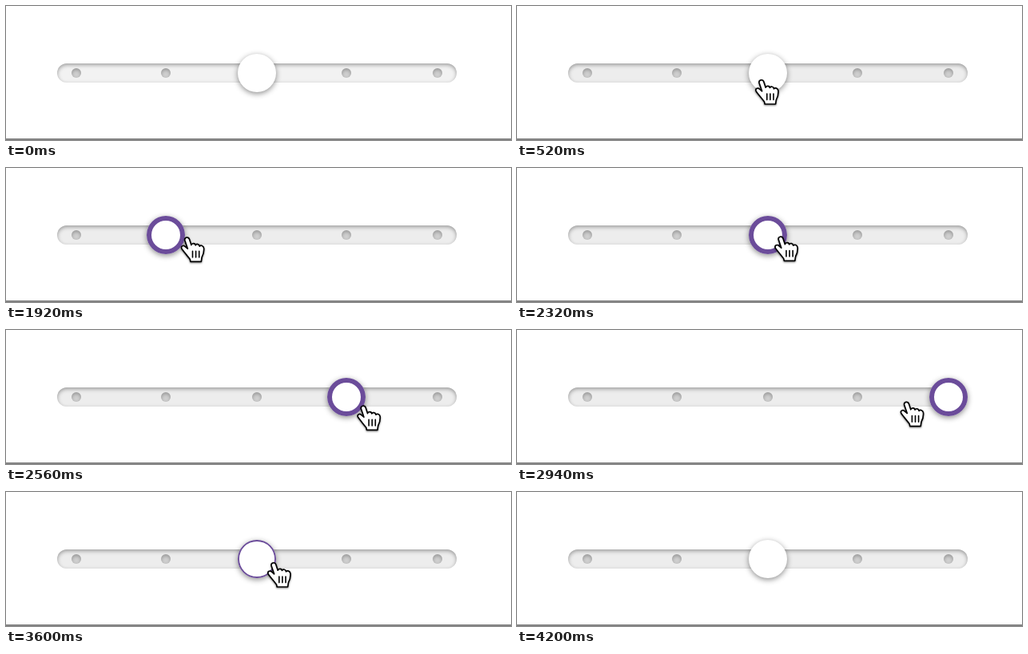
Write an HTML page that moves like this. It is 632 by 168 pixels and loops after 4.58 s.

```html
<!DOCTYPE html>
<html lang="en">
<head>
<meta charset="utf-8">
<title>Snapping slider</title>
<style>
  html, body { margin: 0; width: 100%; height: 100%; overflow: hidden; background: #fff; }
  #stage { position: relative; width: 632px; height: 168px; overflow: hidden; }
  #stage > * { position: absolute; }
  #floor { left: 0; top: 166px; width: 632px; height: 2px; background: #858585; }
  #track {
    left: 64px; top: 72px; width: 500px; height: 24px; border-radius: 12px;
    box-shadow: inset 0 2px 5px rgba(0, 0, 0, .35);
  }
  .dot {
    top: 78px; width: 12px; height: 12px; margin-left: -6px; border-radius: 50%;
    background: #d0d0d0; box-shadow: inset 0 2px 4px rgba(0, 0, 0, .28);
  }
  #knob {
    top: 60px; width: 48px; height: 48px; margin-left: -24px; border-radius: 50%;
    background: #fff;
  }
  #hand {
    left: 0; top: 0; width: 40px; height: 40px; overflow: visible;
    filter: drop-shadow(0 1.5px 1px rgba(0, 0, 0, .5));
  }
</style>
</head>
<body>
<div id="stage">
  <div id="floor"></div>
  <div id="track"></div>
  <div id="knob"></div>
  <svg id="hand" fill="#fff" stroke="#000" stroke-width="1.7" stroke-linejoin="round" stroke-linecap="round">
    <path d="M-2.9 3.8C-3.6-.3 1.7-1.2 2.9 2.6L5.2 9.6C6 7 10 7 10.5 9.9C11.5 7.8 15 8.2 15.5 11.2
      C17 9.4 20.6 10.4 20.9 13.6C21.3 18 20.4 21.4 18.4 25L17.6 30.4H4.2
      L3.6 27.6C1 24-3 19.6-6.6 14.6C-8.4 11.2-5 9.2-2.4 11.6L.6 14.2Z"/>
    <path d="M6.8 17.4V25M10.9 17.4V25M15 17.4V25" stroke-width="1.6"/>
  </svg>
</div>
<script>
  const LOOP = 4580, GRAB = 860, DROP = 3560, MIDDLE = 314;
  // Five stops, 113 px apart, on even pixels
  const stops = Array.from({ length: 5 }, (_, i) => 2 * Math.floor((88 + 113 * i) / 2));
  // Pointer moves, each starting where the last one ended
  const moves = [
    { from: 160, to: 520, x: 306, y: 92 },
    { from: 1180, to: 1540, x: 87, y: 92 },
    { from: 1760, to: 2060, x: 308, y: 83 },
    { from: 2280, to: 2800, x: 527, y: 90, dip: 7 },
    { from: 2860, to: 3360, x: 335, y: 88 },
    { from: 4080, to: 4200, x: 335, y: 180 }
  ];
  const track = document.getElementById('track');
  const knob = document.getElementById('knob');
  const hand = document.getElementById('hand');

  for (const x of stops) {
    const dot = document.createElement('div');
    dot.className = 'dot';
    dot.style.left = x + 'px';
    knob.before(dot);
  }

  const ramp = (t, a, b) => Math.max(0, Math.min(1, (t - a) / (b - a)));
  const easeOut = p => 1 - (1 - p) ** 1.3;

  function pointer(t) {
    let x = 321, y = 180;
    for (const m of moves) {
      const p = ramp(t, m.from, m.to), e = easeOut(p);
      x += (m.x - x) * e;
      y += (m.y - y) * e + (m.dip || 0) * Math.sin(Math.PI * p);
    }
    return [x, y];
  }

  function draw(t) {
    const [x, y] = pointer(t);
    const ring = 6 * ramp(t, GRAB, GRAB + 120) * (1 - ramp(t, DROP, DROP + 60));
    const near = stops.reduce((a, b) => Math.abs(b - x) < Math.abs(a - x) ? b : a);
    const shade = 242 - 5 * ramp(t, 380, 520);
    track.style.backgroundColor = `rgb(${shade}, ${shade}, ${shade})`;
    knob.style.left = (t > GRAB && t < DROP ? near : MIDDLE) + 'px';
    knob.style.boxShadow = `inset 0 0 0 ${ring}px #6b4c9a, 0 2px 7px rgba(0, 0, 0, .45)`;
    hand.style.transform = `translate(${x}px, ${y + .6}px)`;
  }

  const start = performance.now();
  function tick() {
    draw((performance.now() - start) % LOOP);
    requestAnimationFrame(tick);
  }
  tick();
</script>
</body>
</html>
```
